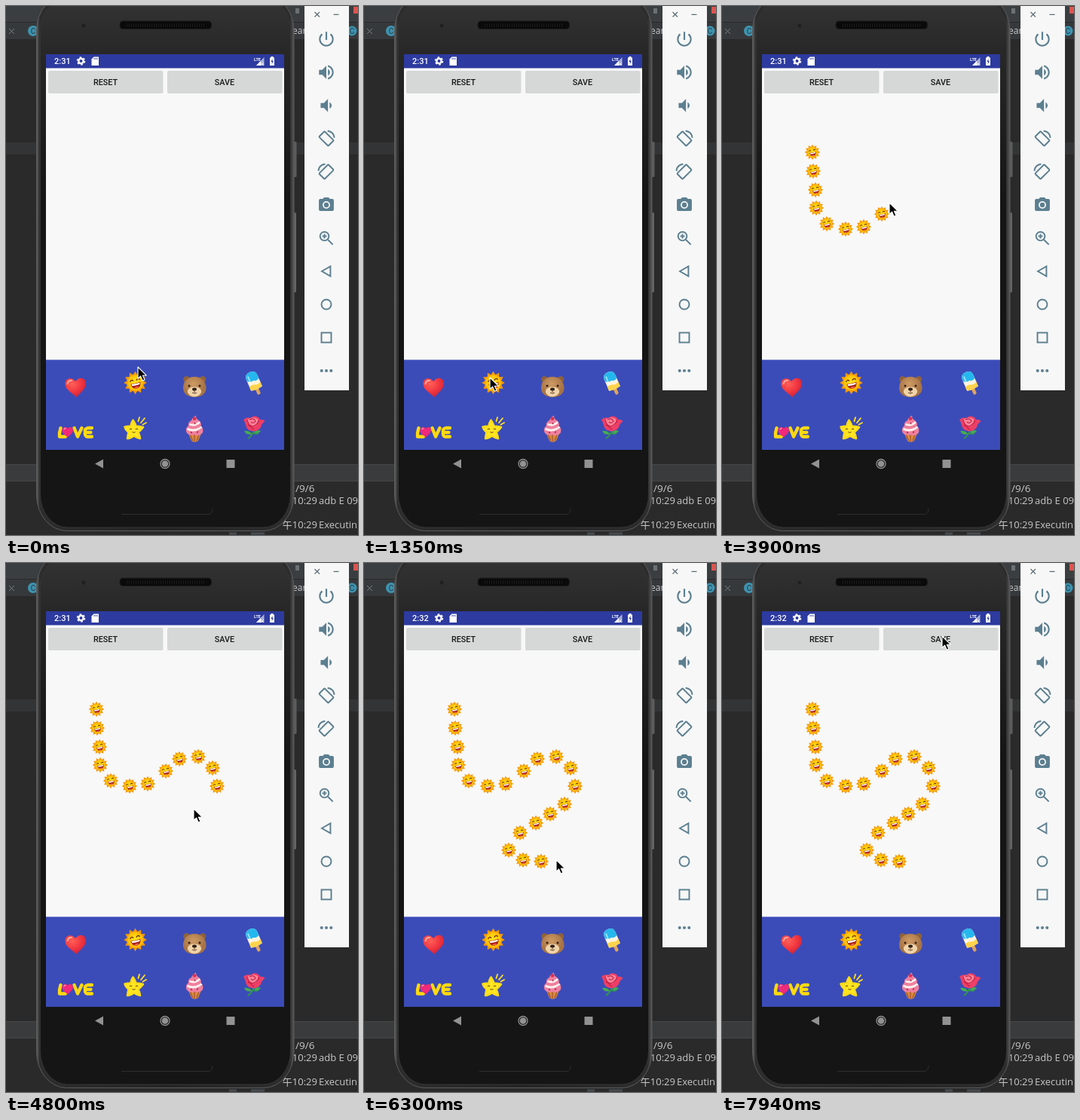
An HTML page for the animation above (8000 ms loop, 467 by 702 pixels).

```html
<!DOCTYPE html>
<html lang="en">
<head>
<meta charset="utf-8">
<title>Sticker brush</title>
<style>
html, body { margin: 0; width: 100%; height: 100%; overflow: hidden; background: #2a2a2a; }
svg { display: block; width: 467px; height: 702px; }
.ui { font-family: Roboto, sans-serif; }
.log { font: 13px "Open Sans", "Noto Sans CJK SC", sans-serif; fill: #c8c8c8; }
.tool { fill: #5c7f90; }
.line { fill: none; stroke: #5c7f90; stroke-width: 1.8; }
</style>
</head>
<body>
<svg viewBox="0 0 467 702" xmlns="http://www.w3.org/2000/svg">
<defs>
  <radialGradient id="gold"><stop offset=".3" stop-color="#ffe01a"/><stop offset="1" stop-color="#ffb900"/></radialGradient>
  <radialGradient id="red" cx=".35" cy=".3" r=".8"><stop offset="0" stop-color="#ff6058"/><stop offset=".55" stop-color="#f03540"/><stop offset="1" stop-color="#c81f35"/></radialGradient>
  <radialGradient id="fur" cx=".45" cy=".35"><stop offset="0" stop-color="#cf9b64"/><stop offset="1" stop-color="#a87446"/></radialGradient>
  <linearGradient id="rim"><stop offset="0" stop-color="#666"/><stop offset=".012" stop-color="#2d2d2d"/><stop offset=".5" stop-color="#242424"/><stop offset=".985" stop-color="#2d2d2d"/><stop offset="1" stop-color="#585858"/></linearGradient>
  <linearGradient id="face" gradientUnits="userSpaceOnUse" x1="0" y1="0" x2="0" y2="260"><stop offset="0" stop-color="#323232"/><stop offset=".25" stop-color="#272727"/><stop offset="1" stop-color="#151515"/></linearGradient>
  <g id="sun">
    <path id="rays" fill="#f6980a"/>
    <circle r="10.8" fill="url(#gold)" stroke="#f7a00a" stroke-width=".8"/>
    <g transform="rotate(-12)">
      <path d="M-6.500-2.500q2.300-3.500 4.500-.3M2-2.800q2.500-3.500 4.800 0" fill="none" stroke="#7a3a10" stroke-width="1.500"/>
      <path d="M-6.500 .3Q0 1.300 7 .3Q6.500 7.800 .4 8Q-5.500 7.800-6.500 .3Z" fill="#a92018"/>
      <path d="M-5.500 1Q0 1.800 6 1L5.300 3.200Q0 3.900-4.900 3.200Z" fill="#fff"/>
      <path d="M-3 6.600Q.5 4.400 3.800 6.400Q.6 8.500-3 6.600Z" fill="#f06a50"/>
    </g>
  </g>
</defs>

<!-- desktop behind the device -->
<rect width="467" height="702" fill="#2a2a2a"/>
<rect width="467" height="21" fill="#3b3e40"/>
<rect y="21" width="467" height="23" fill="#36393b"/>
<path d="M0 21.500H467M0 44.500H467" stroke="#292929"/>
<rect y="181" width="467" height="16" fill="#333435"/>
<rect y="608" width="467" height="22" fill="#393b3d"/>
<path d="M0 608.500H467M0 630.500H467" stroke="#444647"/>
<path d="M4 30l7 7M11 30l-7 7" stroke="#778087"/>
<g class="ui" font-size="10" text-anchor="middle" fill="#233940">
  <circle cx="36" cy="33" r="7" fill="#3e93b0"/><text x="36" y="36.500">C</text>
  <circle cx="459" cy="33" r="6.500" fill="#3e93b0"/><text x="459" y="36.500">C</text>
</g>
<path d="M360 3l5-3 9 7-4 5z" fill="#4f8f5b"/>
<path d="M384 3h5v7h-5z" fill="#6b7073"/>
<rect x="461" y="1" width="6" height="9" fill="#dd5550"/>
<g class="log">
  <text x="380" y="37" font-size="12">ear</text>
  <text x="384" y="645" font-size="13.500">/9/6</text>
  <text x="413" y="661" text-anchor="end">10:29</text><text x="415" y="661">adb E 09</text>
  <text x="413" y="693" text-anchor="end">午10:29</text><text x="415" y="693">Executin</text>
</g>
<path d="M296 700h10M325 700h18" stroke="#464d52" stroke-width="3"/>

<!-- device -->
<rect x="381" y="180" width="4.500" height="47" rx="1.500" fill="#5c5c5c"/>
<rect x="381" y="274" width="4" height="106" rx="1.500" fill="#646464"/>
<rect x="40.500" y="-15" width="341.500" height="711.500" rx="40" ry="48" fill="url(#rim)" stroke="#5b5b5b"/>
<rect x="45.500" y="-10" width="332" height="702" rx="36" ry="44" fill="url(#face)" stroke="#343434"/>
<rect x="151" y="20" width="121.500" height="10.500" rx="4" fill="#0a0a0a" stroke="#1c1c1c"/>
<path d="M160 25.500H264" stroke="#1c1c1c" stroke-width="4" stroke-dasharray="1 2"/>
<circle cx="103" cy="26" r="2.500" fill="#1f2022"/>
<path d="M153 674.500H269Q274 674 274 667" fill="none" stroke="#2e2e2e"/>
<path d="M118 607.500L129 601.500V613.500Z" fill="#929292"/>
<circle cx="211" cy="607.500" r="6" fill="none" stroke="#929292" stroke-width="1.300"/><circle cx="211" cy="607.500" r="4.300" fill="#929292"/>
<rect x="292.500" y="602" width="11" height="11" fill="#929292"/>

<!-- app -->
<rect x="53" y="64" width="316" height="406" fill="#f8f8f8"/>
<rect x="53" y="64" width="316" height="18.500" fill="#2d3a9f"/>
<text id="clock" class="ui" x="64" y="77" font-size="11" font-weight="500" fill="#fff">2:31</text>
<circle cx="99.500" cy="73" r="3.200" fill="none" stroke="#fff" stroke-width="2.400"/>
<circle cx="99.500" cy="73" r="5" fill="none" stroke="#fff" stroke-width="1.500" stroke-dasharray="2.618"/>
<path d="M113.500 70.500l3-3H123V79h-9.500z" fill="#fff"/>
<path d="M117 69v2M119 69v2M121 69v2" stroke="#2d3a9f" stroke-width=".9"/>
<text class="ui" x="329" y="72.500" font-size="5.500" font-weight="700" fill="#fff">LTE</text>
<path d="M332 79L342.500 68V79Z" fill="#a9b0d6"/><path d="M332 79L338 73V79Z" fill="#fff"/>
<path d="M338 75l4 4M342 75l-4 4" stroke="#fff" stroke-width=".8"/>
<path d="M350 68.500h1.500V67h3v1.500H356V79h-6z" fill="#fff"/>
<path d="M353.500 70l-2 4h1.300v3l2-4h-1.300z" fill="#2d3a9f"/>
<g class="ui" font-size="10.800" font-weight="500" text-anchor="middle">
  <g fill="#d6d7d7"><rect x="56" y="86" width="152.500" height="30" rx="2"/><rect x="214" y="86" width="152.500" height="30" rx="2"/></g>
  <g fill="#191919"><text x="132" y="105">RESET</text><text x="290" y="105">SAVE</text></g>
</g>
<rect x="53" y="469.500" width="316" height="119.500" fill="#3b4cb9"/>

<!-- stickers -->
<path d="M93.500 519C87 513 78 509 78.500 500.500C79 493.500 88 492 92 498.500C96 491.500 105 492.500 106 500C106.500 508.500 98.500 513 93.500 519Z" fill="url(#red)"/>
<path d="M81.500 501.500q1-5 5.500-4.500" fill="none" stroke="#ffaaa2" stroke-width="2" stroke-linecap="round"/>
<use href="#sun" x="171.500" y="500"/>
<g>
  <circle cx="239.500" cy="495.500" r="4.300" fill="#8f623c"/><circle cx="261" cy="495.500" r="4.300" fill="#8f623c"/>
  <path d="M250 492C260 492 265.500 499 265.500 507C265.500 515 258 519 250 519C242 519 235 515 235 507C235 499 240 492 250 492Z" fill="url(#fur)"/>
  <path d="M250 505.500C256 505.500 260 509 259 513Q256 518.500 250 518.500Q244 518.500 241 513C240 509 244 505.500 250 505.500Z" fill="#f0d3a8"/>
  <circle cx="243" cy="504" r="1.500" fill="#302018"/><circle cx="257" cy="504" r="1.500" fill="#302018"/>
  <ellipse cx="250" cy="508.500" rx="3" ry="2" fill="#302018"/>
  <path d="M250 510v3m-3 0q3 2.500 6 0" fill="none" stroke="#5a3822" stroke-width=".9"/>
</g>
<g transform="translate(328 497) rotate(-23)">
  <rect x="-2" y="9" width="4.500" height="11" rx="2" fill="#e0a35e"/>
  <path d="M-8 11.500V-4Q-8-12 0-12Q8-12 8-4V11.500Q0 13.500-8 11.500Z" fill="#fff3dd"/>
  <path d="M-8-2V-4Q-8-12 0-12Q8-12 8-4V0Q4 3 0 0Q-4 2-8-2Z" fill="#25b8ee"/>
  <path d="M-8 6Q-4 4 0 6Q4 8 8 5V11.500Q0 13.500-8 11.500Z" fill="#ffd34c"/>
  <path d="M-4.500-7v11" stroke="#fff" stroke-opacity=".55" stroke-width="2" stroke-linecap="round"/>
</g>
<g fill="none" stroke="#ffd910" stroke-width="4.300" stroke-linecap="round" stroke-linejoin="round">
  <path d="M72.500 560Q70.500 566 71 571.500H79M90.500 560L95 571.500L100.500 560M114 560H108.500Q104 561 105 565Q104 571 108 571.500H114M106 565.800H112.500"/>
</g>
<path d="M82 572.500C78 569 74 567 74.500 562.500C75 558 80 557.500 81.800 561C84 557 89 558.500 89 563C88.500 567.500 84.500 569 82 572.500Z" fill="#f02a78"/>
<path d="M77 562q1-2 2.500-1.500" fill="none" stroke="#ffa0c2" stroke-width="1.300"/>
<path d="M168.500 549.500Q171 553 172.500 557.500Q178 557.500 182 559Q179 563 175.500 565.500Q177.500 570 178 574Q173.500 573 169.500 570.500Q165 574 161 574Q161.500 570 162.500 565.500Q158.500 562.500 157.500 558.500Q161.500 557.500 165.500 557.500Q166 553 168.500 549.500Z" fill="#ffe522" stroke="#ffdd18" stroke-linejoin="round" stroke-width="2.500"/>
<path d="M164 562q1.500-2 3 0M172 562q1.500-2 3 0M167.500 565q2 2.500 4 0" fill="none" stroke="#6d4b12" stroke-width="1.100"/>
<path d="M175.500 551L177 546M179 553L184 547M181.500 555.500L186 553" stroke="#ffdd27" stroke-width="1.900" stroke-linecap="round"/>
<g>
  <path d="M241.500 566L259.500 566L255 577Q250 580.500 246 577Z" fill="#d98a40"/>
  <path d="M244.500 569l3 8M250 569v9M256 569l-3 8" stroke="#a5532c" stroke-width="1.200"/>
  <path d="M239.500 566Q237.500 560 242 557Q241 552 246 550Q247 546 252 543.500Q252 548 256 550Q260 553 258.500 557Q263 561 260.500 567Q255 571.500 250 569Q243 571 239.500 566Z" fill="#f07f9d"/>
  <path d="M240.500 561Q250 566 259.500 558.500M243.500 555Q251 558 257 552" fill="none" stroke="#fff0ee" stroke-width="2.800"/>
  <path d="M245 565.500l2 1M253 566l2-1M250 553l1 2" stroke="#a02a48" stroke-width="1.500"/>
  <circle cx="250" cy="547.500" r="2.300" fill="#d92f50"/>
</g>
<g>
  <path d="M329 561Q329 568 321 574M327 566Q331 569 335 567" fill="none" stroke="#32994a" stroke-width="1.800"/>
  <path d="M326 568Q319 570 316 564Q323 563 326 568ZM329 566Q332 561 338 564Q335 569 329 566Z" fill="#45ad4f"/>
  <path d="M315 549Q319 545 324 547Q329 542 335 546L337 549Q341 548 343.500 551Q339 554 338 559Q334 565 327 564Q319 563 318 556Q317 552 315 549Z" fill="#ee3f66"/>
  <path d="M320 549Q327 544 334 548Q335 556 329 558Q322 556 320 549Z" fill="#ff8298"/>
  <path d="M323 549Q329 546 331 551Q328 555 325 552M321 556Q330 561 336 550M320 549Q322 558 329 562" fill="none" stroke="#bd1e45" stroke-width="1.100"/>
</g>
<g id="stamps"></g>

<!-- emulator tool strip -->
<rect x="396" width="59" height="510" fill="#f7f7f7"/>
<path d="M409.500 8l6.500 6.500M416 8l-6.500 6.500M434.500 11.300h7" stroke="#5b6c74" stroke-width="1.200"/>
<g id="tools"></g>
<path id="cursor" d="M0 0V15.500L3.600 12.200L6.200 18.300L9 17.100L6.400 11.200H11.200Z" fill="#050505" stroke="#fff" stroke-width="1.100" stroke-linejoin="round"/>
</svg>
<script>
const $ = id => document.getElementById(id);
const turn = '<rect class="line" x="-8" y="-4.800" width="16" height="9.600" rx="1" transform="rotate(45)"/><path class="line" d="M1.500-9.500Q9-8.500 9.800-1"/>';

const tools = [
  '<path d="M13 3h-2v10h2V3zm4.830 2.170l-1.420 1.420C17.990 7.860 19 9.810 19 12c0 3.870-3.130 7-7 7s-7-3.130-7-7c0-2.190 1.010-4.140 2.580-5.420L6.170 5.170C4.230 6.820 3 9.260 3 12c0 4.970 4.030 9 9 9s9-4.030 9-9c0-2.740-1.230-5.180-3.170-6.830z" transform="translate(-12 -12)"/>',
  '<path d="M3 9v6h4l5 5V4L7 9H3zm13.500 3c0-1.770-1.020-3.290-2.500-4.030v8.050c1.480-.73 2.500-2.250 2.500-4.020zM14 3.230v2.060c2.890.86 5 3.540 5 6.710s-2.110 5.850-5 6.710v2.060c4.010-.91 7-4.490 7-8.770s-2.990-7.860-7-8.770z" transform="translate(-12 -12)"/>',
  '<path d="M18.500 12c0-1.770-1.020-3.290-2.500-4.030v8.050c1.480-.73 2.500-2.250 2.500-4.020zM5 9v6h4l5 5V4L9 9H5z" transform="translate(-12 -12)"/>',
  turn,
  `<g transform="scale(-1 1)">${turn}</g>`,
  '<g transform="scale(.92)"><path fill-rule="evenodd" d="M-3-10L-4.800-8H-8Q-10-8-10-6V6Q-10 8-8 8H8Q10 8 10 6V-6Q10-8 8-8H4.800L3-10ZM0-5A5 5 0 1 1 0 5A5 5 0 1 1 0-5Z"/><circle r="3.200"/></g>',
  '<circle class="line" cx="-2.300" cy="-2.300" r="5.400"/><path class="line" d="M1.800 1.800L8 8M-5-2.300H.4M-2.300-5V.4"/>',
  '<path class="line" d="M-5.500 0L5-6V6Z"/>',
  '<circle class="line" r="6"/>',
  '<rect class="line" x="-6" y="-6" width="12" height="12"/>',
  '<circle cx="-5.800" r="1.900"/><circle r="1.900"/><circle cx="5.800" r="1.900"/>'
];
$('tools').innerHTML = tools.map((art, i) =>
  `<g class="tool" transform="translate(425 ${44 + 44 * i}) scale(1.08)">${art}</g>`).join('');

const spikes = 12;
$('rays').setAttribute('d', 'M' + Array.from({ length: spikes * 2 }, (_, i) => {
  const a = i * Math.PI / spikes, r = i % 2 ? 11 : 15.3;
  return (r * Math.cos(a)).toFixed(2) + ' ' + (r * Math.sin(a)).toFixed(2);
}).join('L') + 'Z');

// places where the brush leaves a sticker
const trail = [
  [120, 194], [121, 219], [124, 244], [125, 268], [139, 289], [164, 296], [188, 293],
  [212, 276], [230, 260], [255, 257], [274, 272], [280, 296], [266, 320], [247, 333],
  [228, 345], [207, 358], [192, 381], [211, 394], [235, 396]
];
const path = [...trail, [256, 399]];
$('stamps').innerHTML = trail.map(([x, y]) =>
  `<use href="#sun" transform="translate(${x} ${y}) scale(.67)"/>`).join('');
const stamps = [...$('stamps').children];

const head = [[3150, 1.6], [3900, 7.6], [4800, 12.85], [5550, 15.6], [6150, 18.8], [6300, 19]];
const count = [[3000, 0], [3150, 1], [3900, 8], [4800, 12], [6150, 19]];
const hover = [
  [0, 175, 479], [450, 168, 494], [600, 168, 494], [750, 167, 493], [900, 165, 491], [1050, 164, 492],
  [1350, 167, 493], [2250, 167, 493], [2400, 133, 273], [2550, 118, 193], [3000, 118, 193]
];
const leave = [
  [6300, 255, 394], [6450, 257, 380], [6600, 262, 325], [6750, 272, 240],
  [6900, 284, 160], [7050, 291, 112], [7200, 293, 101], [7350, 293, 99], [7950, 292, 97]
];

function at(keys, t) {
  if (t <= keys[0][0]) return keys[0].slice(1);
  for (let i = 1; i < keys.length; i++) {
    const a = keys[i - 1], b = keys[i];
    if (t <= b[0]) {
      const k = (t - a[0]) / (b[0] - a[0]);
      return a.slice(1).map((v, j) => v + (b[j + 1] - v) * k);
    }
  }
  return keys[keys.length - 1].slice(1);
}

function pointer(t) {
  if (t < 3150) return at(hover, t);
  if (t >= 6300) return at(leave, t);
  const [x, y] = at(path.map((p, i) => [i, ...p]), at(head, t)[0]);
  return [x - 1, y - 5];
}

function draw(now) {
  const t = now % 8000;
  const step = t >= 7940 ? 7950 : Math.floor(t / 150) * 150;
  const [x, y] = pointer(step).map(Math.round);
  const shown = Math.floor(at(count, step)[0] + 1e-6);
  $('cursor').setAttribute('transform', `translate(${x} ${y})`);
  stamps.forEach((s, i) => s.setAttribute('visibility', i < shown ? 'visible' : 'hidden'));
  $('clock').textContent = step < 5550 ? '2:31' : '2:32';
}

const start = performance.now();
function tick() {
  draw(performance.now() - start);
  requestAnimationFrame(tick);
}
tick();
</script>
</body>
</html>
```
